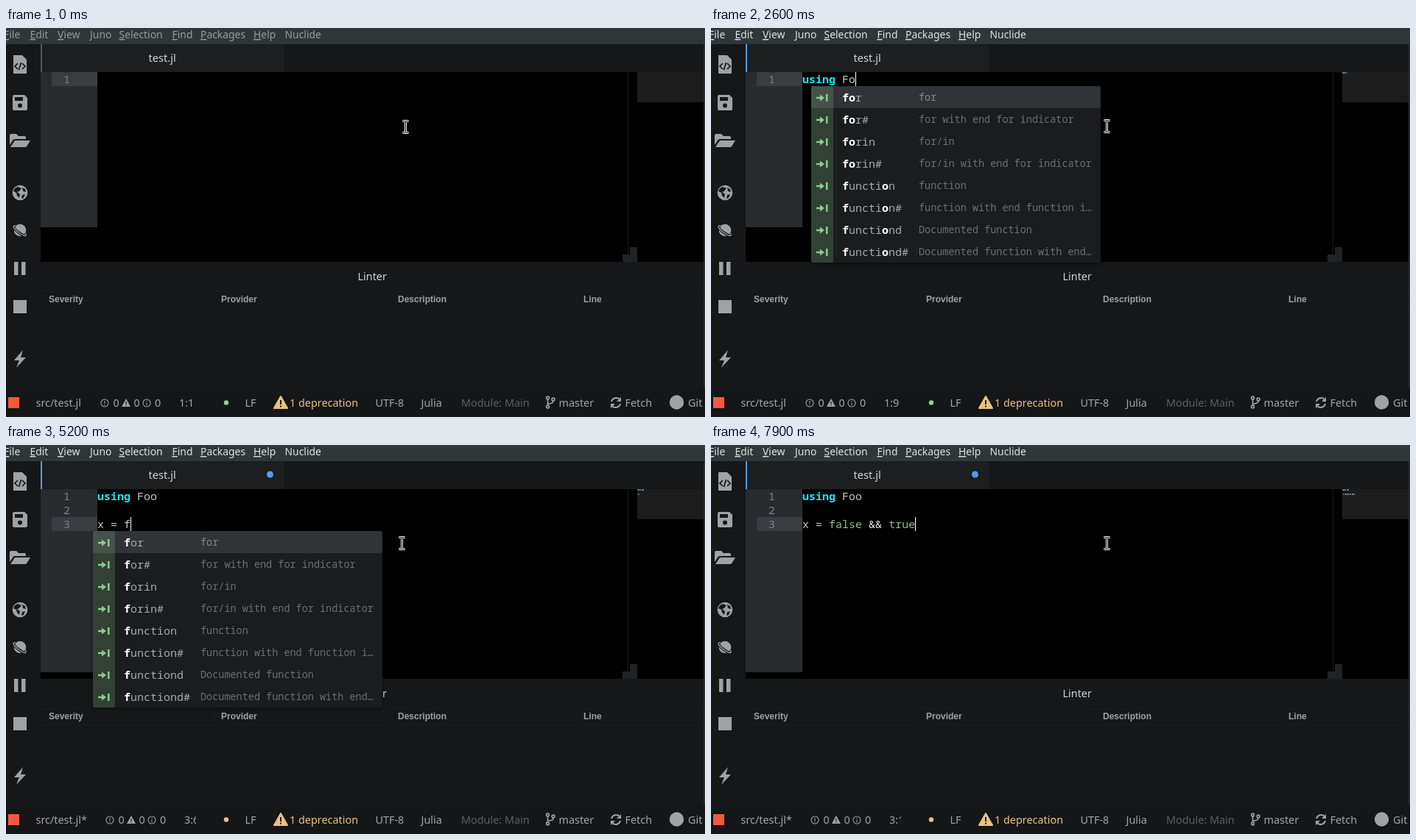
An HTML page that plays this animation: 949 by 529 pixels, repeating every 8000 ms.

```html
<!DOCTYPE html>
<html lang="en">
<head>
<meta charset="utf-8">
<title>Editor autocomplete</title>
<style>
html, body { margin: 0; width: 100%; height: 100%; overflow: hidden; background: #161719; }
svg { display: block; width: 949px; height: 529px; }
text { white-space: pre; font: 14.4px "Noto Sans", "Open Sans", sans-serif; fill: #a2a5a8; }
#menu text { font-size: 13.9px; fill: #959b9e; }
#menu.focus text { fill: #dfe3e5; }
.u { text-decoration: underline; }
.head text { font: bold 12px "Liberation Sans", sans-serif; fill: #9fa1a4; }
.code text, .code { font: 15px "Noto Sans Mono", "DejaVu Sans Mono", monospace; fill: #c5c8c6; }
.code .num { fill: #7d8287; }
.code .kw { fill: #18e6f2; font-weight: bold; }
.code .bool { fill: #93bf8c; }
.code .op { fill: #e6e6e6; }
.code .hit { fill: #fff; font-weight: bold; }
.code .label { fill: #a6a9ac; }
.code .desc { font-size: 13.5px; fill: #6c6f72; }
.code .picked { fill: #85888c; }
#popup { filter: drop-shadow(0 2px 2px rgba(0, 0, 0, .45)); }
.icons { fill: #a0a3a6; stroke: none; }
.line { fill: none; stroke: #a0a3a6; }
</style>
</head>
<body>
<svg viewBox="0 0 949 529">
  <rect width="949" height="529" fill="#161719"/>
  <rect width="949" height="22" fill="#2f3739"/>
  <g id="menu"></g>

  <rect x="47" y="22" width="330" height="38" fill="#1c1e20"/>
  <rect id="edge" x="47" y="22" width="2" height="38"/>
  <text x="193.500" y="46" style="font-size:14.6px;fill:#d2d4d6">test.jl</text>
  <circle id="tabDot" cx="358.500" cy="40" r="4.5" fill="#569aea"/>

  <rect x="47" y="60" width="900" height="258" fill="#000"/>
  <rect id="gutter" x="47" y="60" width="77" fill="#282c2f"/>
  <rect id="active" x="62" width="62" height="19" fill="#393d41"/>
  <rect x="844" y="60" width="1" height="258" fill="#1b1b1b"/>
  <rect x="857" y="60" width="90" height="41" fill="#1c1c1c"/>
  <path d="M847 298h10v20h-20v-10h10z" fill="#212224"/>
  <g id="map"></g>
  <g id="code" class="code"></g>
  <rect id="caret" width="1" height="19" fill="#fff"/>

  <text x="477.5" y="343" style="fill:#d2d4d6">Linter</text>
  <path d="M47 358.5H947M47 380.5H947M282.5 358v22M522.5 358v22M774.5 358v22" stroke="#1a1b1d"/>
  <g class="head">
    <text x="58" y="373">Severity</text><text x="292" y="373">Provider</text>
    <text x="532" y="373">Description</text><text x="784" y="373">Line</text>
  </g>
  <rect x="947" y="22" width="2" height="467" fill="#292b2d"/>

  <g class="icons">
    <path d="M10 37h12l6 6v19h-18z"/>
    <path d="M16 48l-4 4 4 4M22 48l4 4-4 4M20.5 47l-3 10" fill="none" stroke="#161719" stroke-width="1.7"/>
    <path d="M11 91h14l4 4v15q0 2-2 2h-16q-2 0-2-2v-17q0-2 2-2z"/>
    <path d="M12 94h11v5h-11z" fill="#161719"/><circle cx="19" cy="105.500" r="3" fill="#161719"/>
    <path d="M5 159v-13q0-2 2-2h7l3 3h8q2 0 2 2v2h-15q-2 0-3 2z"/>
    <path d="M12 153h21l-5 8q-1 1-2 1h-20z"/>
    <circle cx="19" cy="224" r="10.300"/>
    <path d="M12 218l4-2 5 2-3 4-3 1 4 3-1 5-3-3-1-4-4-2zM22 217l4 2 1 4-4-1zM22 227l4-1-2 5-3 1z" fill="#161719"/>
    <circle cx="19" cy="275" r="8.300"/>
    <g transform="translate(19 275) rotate(38)" fill="none">
      <path d="M-8.500-1.500C-14 2-7 3.500 0 3.500S14 2 8.500-1.500" stroke="#161719" stroke-width="3.600"/>
      <path d="M-8.500-1.500C-14 2-7 3.500 0 3.500S14 2 8.500-1.500" stroke="#a0a3a6" stroke-width="1.300"/>
    </g>
    <path d="M11 318h5.500v18h-5.500zM21 318h5.500v18h-5.500zM10 370h18v18h-18zM23 438l-12 14h7l-4 10 13-14h-7z"/>
  </g>

  <rect y="489" width="949" height="40" fill="#151618"/>
  <rect x="3" y="502" width="15" height="15" fill="#f4593d"/>
  <text id="path" x="40.500" y="515"></text>
  <g id="counts">
    <g class="line" stroke-width="1.1">
      <circle cx="134" cy="510" r="5"/><path d="M134 507v4M134 512v1.300"/>
      <circle cx="191" cy="510" r="5"/><path d="M191 507v1.300M191 509.500v3.500"/>
    </g>
    <path d="M163 504l6 11h-12z" class="icons"/>
    <path d="M163 508v3.500M163 512.500v1.300" stroke="#151618" stroke-width="1.2"/>
    <text x="145.500" y="515">0</text><text x="173.500" y="515">0</text><text x="202" y="515">0</text>
  </g>
  <clipPath id="posClip"><rect x="230" y="495" width="28" height="30"/></clipPath>
  <g clip-path="url(#posClip)"><text id="pos" y="515"></text></g>
  <circle id="dot" cx="299" cy="509.500" r="3.200"/>
  <text x="324.500" y="515">LF</text>
  <path d="M373 501l9 16h-18z" fill="#e9c282" stroke="#e9c282" stroke-width="2" stroke-linejoin="round"/>
  <path d="M373 506v6M373 513.500v2" stroke="#151618" stroke-width="2"/>
  <text x="385" y="515" style="fill:#e9c282">1 deprecation</text>
  <text x="501.500" y="515">UTF-8</text><text x="563.500" y="515">Julia</text>
  <text x="618" y="515" style="fill:#5c5f62">Module: Main</text>
  <g class="line" stroke-width="1.6">
    <circle cx="735.500" cy="503" r="1.900"/><circle cx="735.500" cy="515" r="1.900"/><circle cx="743" cy="505" r="1.900"/>
    <path d="M735.500 505v8M743 507q0 4-7 4"/>
    <path d="M822 508a6.500 6.500 0 0 1 11-3M834 511a6.500 6.500 0 0 1-11 3" stroke-width="1.9"/>
  </g>
  <path d="M835 502v6h-6zM821 517v-6h6z" class="icons"/>
  <text x="750.500" y="515">master</text><text x="840.500" y="515">Fetch</text>
  <circle cx="910.500" cy="509" r="9.700" fill="#a0a3a6"/>
  <text x="926" y="515">Git</text>

  <g id="popup" class="code"></g>
  <g id="mouse">
    <g id="beam" fill="none">
      <path d="M-4-8h3l1 1 1-1h3M-4 8h3l1-1 1 1h3M0-7V7" stroke="#fff" stroke-width="3"/>
      <path d="M-3.500-8h3l.5 1 .5-1h3M-3.500 8h3l.5-1 .5 1h3M0-7V7" stroke="#000"/>
    </g>
    <path id="arrow" d="M0 1v17l4-3.500 3 6 3.300-1.600-3-6h4.700z" fill="#111" stroke="#fff" stroke-width="1.2"/>
  </g>
</svg>
<script>
const LOOP = 8000, CELL = 9, LEFT = 124, TOP = 60, ROW = 19, ITEM = 30;
const FOCUS = 500, MODIFIED = 3100, MAP_LAG = 150;
const $ = id => document.getElementById(id);
const set = (id, attrs) => {
  for (const k in attrs) $(id).setAttribute(k, attrs[k]);
};
const show = (id, on) => $(id).style.display = on ? '' : 'none';

const TRY = [
  ['try', 'try/catch'], ['try#', 'try/catch with end try indic…'],
  ['trycf', 'try/catch/finally'], ['trycf#', 'try/catch/finally with end t…'],
  ['tryf', 'try/finally'], ['tryf#', 'try/finally with end try ind…']
];
const LISTS = {
  u: [['using', 'import a package']],
  f: [
    ['for', 'for'], ['for#', 'for with end for indicator'],
    ['forin', 'for/in'], ['forin#', 'for/in with end for indicator'],
    ['function', 'function'], ['function#', 'function with end function i…'],
    ['functiond', 'Documented function'], ['functiond#', 'Documented function with end…']
  ],
  t: [...TRY, ['tv', 'Typed variable']],
  tr: TRY
};

// time, text, list shown
const A = 'using Foo\n\n';
const STEPS = [
  [0, ''], [FOCUS, ''],
  [1700, 'u', 'u'], [1900, 'us', 'u'], [2000, 'usi', 'u'], [2100, 'using'],
  [2300, 'using '], [2400, 'using F', 'f'], [2600, 'using Fo', 'f'], [2800, 'using Foo'],
  [3400, 'using Foo\n'], [3600, A],
  [4100, A + 'x'], [4300, A + 'x '], [4700, A + 'x ='], [4800, A + 'x = '],
  [5100, A + 'x = f'], [5200, A + 'x = f', 'f'], [5400, A + 'x = fa'],
  [5500, A + 'x = fal'], [5700, A + 'x = fals'], [5800, A + 'x = false'],
  [6100, A + 'x = false '], [6300, A + 'x = false &'], [6500, A + 'x = false &&'],
  [6700, A + 'x = false && '], [6900, A + 'x = false && t'], [7000, A + 'x = false && t', 't'],
  [7200, A + 'x = false && tr', 'tr'], [7400, A + 'x = false && tru'], [7600, A + 'x = false && true']
];
const MOUSE = [[0, 542.5, 134.5], [800, 540.5, 134.5], [900, 537.5, 133.5]];
const at = (table, t) => table.findLast(s => s[0] <= t) || table[0];

const esc = s => s.replace(/&/g, '&amp;');
const text = (x, y, body, cls = '') => `<text x="${x}" y="${y}" class="${cls}">${body}</text>`;
const kind = w => w === 'using' ? 'kw' : /^(true|false)$/.test(w) ? 'bool' : /^&/.test(w) ? 'op' : '';
const paint = line => line.replace(/\S+/g, w => `<tspan class="${kind(w)}">${esc(w)}</tspan>`);

function mark(label, typed) {
  let i = 0;
  return [...label].map(c => c === typed[i] ? (i++, `<tspan class="hit">${c}</tspan>`) : c).join('');
}

// The list hangs below the caret's line, its labels aligned with the typed word.
function popupMarkup(items, word, row, col) {
  const x = LEFT + col * CELL - 42, y = TOP + (row + 1) * ROW;
  const longest = i => Math.max(...items.map(r => r[i].length));
  const descX = x + 56 + longest(0) * CELL;
  const w = descX + longest(1) * 8.1 + 12 - x, h = items.length * ITEM;
  return `<rect x="${x}" y="${y}" width="${w}" height="${h}" rx="2" fill="#1a1c1e"/>
    <rect x="${x}" y="${y}" width="${w}" height="${ITEM}" rx="2" fill="#303338"/>
    <rect x="${x}" y="${y}" width="30" height="${h}" rx="2" fill="#324036"/>
    <rect x="${x}" y="${y}" width="30" height="${ITEM}" rx="2" fill="#465249"/>` +
    items.map(([label, desc], i) => {
      const mid = y + i * ITEM + 16;
      return `<path d="M${x + 7} ${mid - 1.2}h5v-3.300l6 4.500-6 4.500v-3.300h-5zM${x + 20} ${mid - 5}h2.500v10h-2.500z" fill="#8fca92"/>` +
        text(x + 42, mid + 5, mark(label, word), 'label') +
        text(descX, mid + 4, desc, i ? 'desc' : 'desc picked');
    }).join('');
}

function mapMarkup(src) {
  return src.split('\n').map((line, row) => [...line].map((c, i) => {
    if (c === ' ') return '';
    const fill = row === 0 && i < 5 ? '#2fa3ab' : '#858987';
    return `<rect x="${857 + i}" y="${TOP + row * 3}" width="1" height="2" fill="${fill}" opacity="${i % 3 ? .9 : .65}"/>`;
  }).join('')).join('');
}

let last = '';
function drawStep([, src, list]) {
  const lines = src.split('\n'), row = lines.length - 1, line = lines[row];
  $('code').innerHTML = lines.map((l, i) => {
    const y = TOP + i * ROW + 15;
    return text(78, y, i + 1, 'num') + text(LEFT, y, paint(l));
  }).join('');
  set('gutter', { height: 211 + row * ROW });
  set('active', { y: TOP + row * ROW });
  set('caret', { x: LEFT + line.length * CELL, y: TOP + row * ROW });
  $('pos').textContent = `${row + 1}:${line.length + 1}`;
  const word = line.split(' ').pop();
  $('popup').innerHTML = list ? popupMarkup(LISTS[list], word.toLowerCase(), row, line.length - word.length) : '';
}

function render(t) {
  const step = at(STEPS, t), mapped = at(STEPS, t - MAP_LAG);
  const key = step[0] + '/' + mapped[0];
  if (key !== last) {
    drawStep(step);
    $('map').innerHTML = mapMarkup(mapped[1]);
    last = key;
  }
  const focused = t >= FOCUS, dirty = t >= MODIFIED;
  $('menu').classList.toggle('focus', focused);
  set('edge', { fill: focused ? '#569aea' : '#55585b' });
  show('caret', focused && (t - step[0]) % 800 < 400);

  set('tabDot', { r: 4.5 * Math.min(1, Math.max(0, (t - MODIFIED + 100) / 300)) });
  show('tabDot', dirty);
  $('path').textContent = 'src/test.jl' + (dirty ? '*' : '');
  set('counts', { transform: `translate(${dirty ? 7 : 0} 0)` });
  set('pos', { x: dirty ? 242 : 235 });
  set('dot', { fill: dirty ? '#e9c08a' : '#8fd19b' });

  const [, mx, my] = at(MOUSE, t), over = /^t/.test(step[2] || '');
  set('mouse', { transform: `translate(${mx} ${my})` });
  show('beam', !over);
  show('arrow', over);
}

$('menu').innerHTML = [
  [-3, 'File', 1], [32.5, 'Edit', 1], [70, 'View', 1], [114, 'Juno'], [153.5, 'Selection', 1],
  [225.5, 'Find', 1], [264, 'Packages', 1], [336, 'Help', 1], [378.5, 'Nuclide']
].map(([x, s, u]) => text(x, 14, u ? `<tspan class="u">${s[0]}</tspan>${s.slice(1)}` : s)).join('');

const start = performance.now();
function tick() {
  render((performance.now() - start) % LOOP);
  requestAnimationFrame(tick);
}
tick();
</script>
</body>
</html>
```
